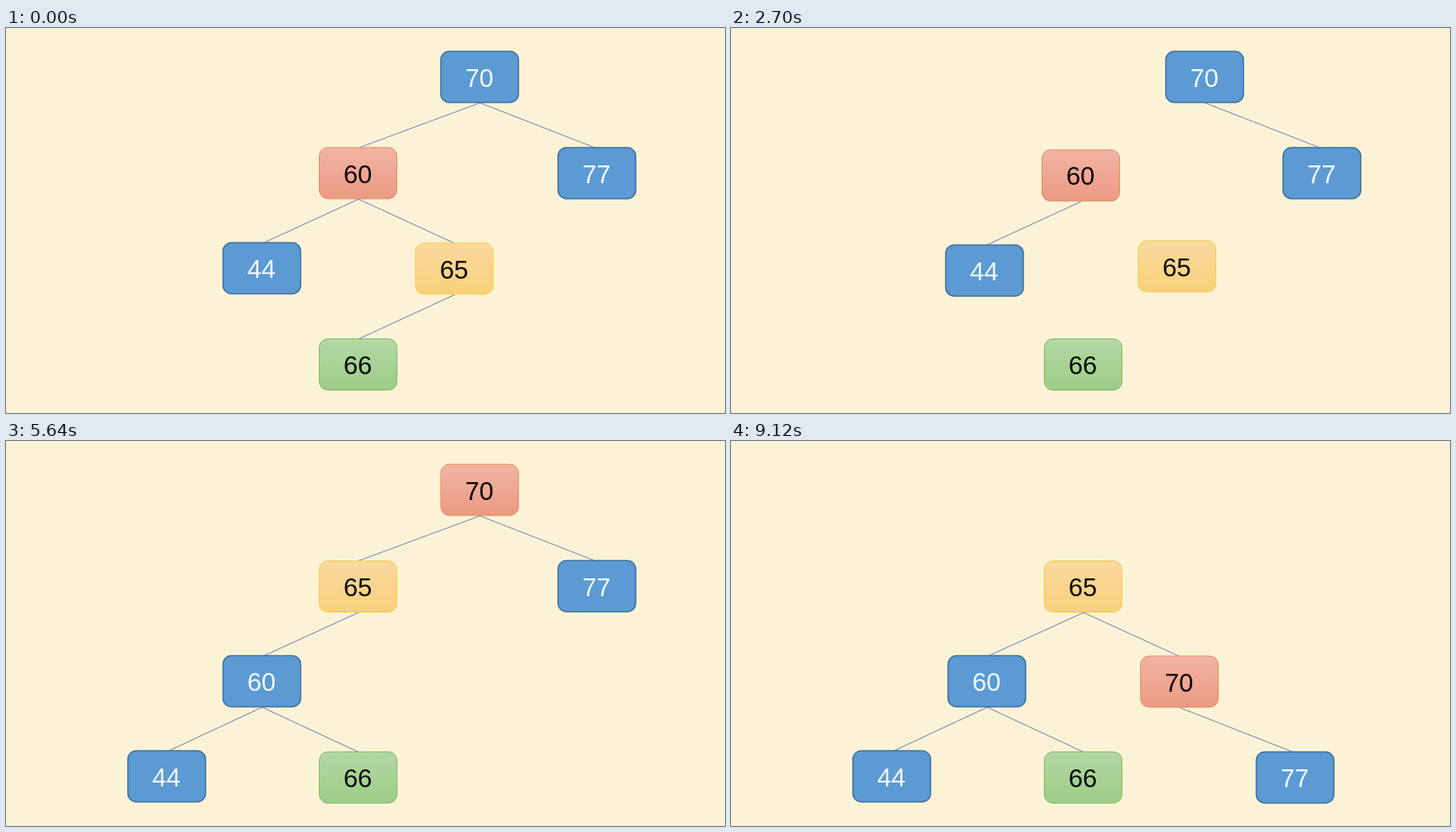
Recreate the animation shown at these times as an HTML page with a canvas. Size 926 px wide and 496 px high, loop 9150 ms.

```html
<!DOCTYPE html>
<html lang="en">
<head>
<meta charset="utf-8">
<title>Tree rotation</title>
<style>
  html, body { margin: 0; width: 100%; height: 100%; overflow: hidden; background: #fcf3d6; }
  canvas { display: block; }
</style>
</head>
<body>
<canvas id="stage" width="926" height="496"></canvas>
<script>
const ctx = document.getElementById('stage').getContext('2d');
const LOOP = 9150, STEP = 30;
const BOX_W = 100, BOX_H = 66, RADIUS = 11;
const MOVE = 1600, FIRST_MOVE = 2524, SECOND_MOVE = 6592;
const RECOLOUR = 4950, FADE = 400;

const styles = {
  blue: { top: '#5b9ad3', bottom: '#5b9ad3', border: '#3f6f9c', text: '#f3f7fb', line: 1.6 },
  red: { top: '#f1b4a3', bottom: '#ec9a83', border: '#e08a55', text: '#0c0805', line: 1 },
  yellow: { top: '#fad9a0', bottom: '#f9d07a', border: '#f3cb45', text: '#0c0a05', line: 1 },
  green: { top: '#b4d8a4', bottom: '#9ccd86', border: '#7db558', text: '#050c05', line: 1 }
};

const nodes = {
  70: { from: [610, 63], to: [577.5, 310], start: SECOND_MOVE, look: 'blue', later: 'red' },
  77: { from: [761, 187], to: [726.5, 433.5], start: SECOND_MOVE, look: 'blue' },
  60: { from: [453.5, 187], to: [329.5, 309.5], start: FIRST_MOVE, look: 'red', later: 'blue' },
  65: { from: [577.5, 310], to: [453.5, 187.5], start: FIRST_MOVE, look: 'yellow' },
  44: { from: [329.5, 309.5], to: [207, 432], start: FIRST_MOVE, look: 'blue' },
  66: { from: [453.5, 433.5], look: 'green' }
};

// Links fade in at `show` and out at `hide`; `shift` moves the child end.
const links = [
  { parent: 70, child: 60, shift: 1.5, hide: 1750 },
  { parent: 60, child: 65, shift: -0.5, hide: 1750 },
  { parent: 65, child: 66, shift: 1, hide: 1750 },
  { parent: 70, child: 77, shift: -3 },
  { parent: 60, child: 44, shift: 3 },
  { parent: 70, child: 65, shift: 0, show: 4250, hide: 6050 },
  { parent: 65, child: 60, shift: 3, show: 4250 },
  { parent: 60, child: 66, shift: 0, show: 4250 },
  { parent: 65, child: 70, shift: -1, show: 8300 }
];

const progress = (t, start, length) => Math.min(1, Math.max(0, (t - start) / length));
const ease = u => u < 0.5 ? 2 * u * u : 1 - 2 * (1 - u) ** 2;

function position(node, t) {
  if (!node.to) return node.from;
  const k = ease(progress(t, node.start, MOVE));
  return node.from.map((a, i) => a + (node.to[i] - a) * k);
}

function drawLink({ parent, child, shift, show, hide }, t) {
  let alpha = 1;
  if (show) alpha *= progress(t, show, FADE);
  if (hide) alpha *= 1 - progress(t, hide, FADE);
  if (!alpha) return;
  const [px, py] = position(nodes[parent], t);
  const [cx, cy] = position(nodes[child], t);
  ctx.globalAlpha = alpha;
  ctx.strokeStyle = '#7489b5';
  ctx.lineWidth = 1.15;
  ctx.beginPath();
  ctx.moveTo(px + 0.5, py + BOX_H / 2 + 0.5);
  ctx.lineTo(cx + shift, cy - BOX_H / 2);
  ctx.stroke();
}

function drawBox(label, [x, y], style, alpha) {
  if (!alpha) return;
  const top = y - BOX_H / 2;
  const fill = ctx.createLinearGradient(0, top, 0, top + BOX_H);
  fill.addColorStop(0, style.top);
  fill.addColorStop(1, style.bottom);
  ctx.globalAlpha = alpha;
  ctx.fillStyle = fill;
  ctx.strokeStyle = style.border;
  ctx.lineWidth = style.line;
  ctx.beginPath();
  ctx.roundRect(x - BOX_W / 2, top, BOX_W, BOX_H, RADIUS);
  ctx.fill();
  ctx.stroke();
  ctx.fillStyle = style.text;
  ctx.fillText(label, x - 0.5, y + 12.5);
}

function draw(t) {
  ctx.globalAlpha = 1;
  ctx.fillStyle = '#fcf3d6';
  ctx.fillRect(0, 0, 926, 496);
  ctx.font = '33px "Liberation Sans", Arial, sans-serif';
  ctx.textAlign = 'center';
  links.forEach(link => drawLink(link, t));
  for (const [label, node] of Object.entries(nodes)) {
    const at = position(node, t);
    const mix = node.later ? progress(t, RECOLOUR, FADE) : 0;
    if (mix < 1) drawBox(label, at, styles[node.look], 1);
    if (mix > 0) drawBox(label, at, styles[node.later], mix);
  }
}

const begin = performance.now();
function tick() {
  const t = (performance.now() - begin) % LOOP;
  draw(Math.floor(t / STEP) * STEP);
  requestAnimationFrame(tick);
}
tick();
</script>
</body>
</html>
```
